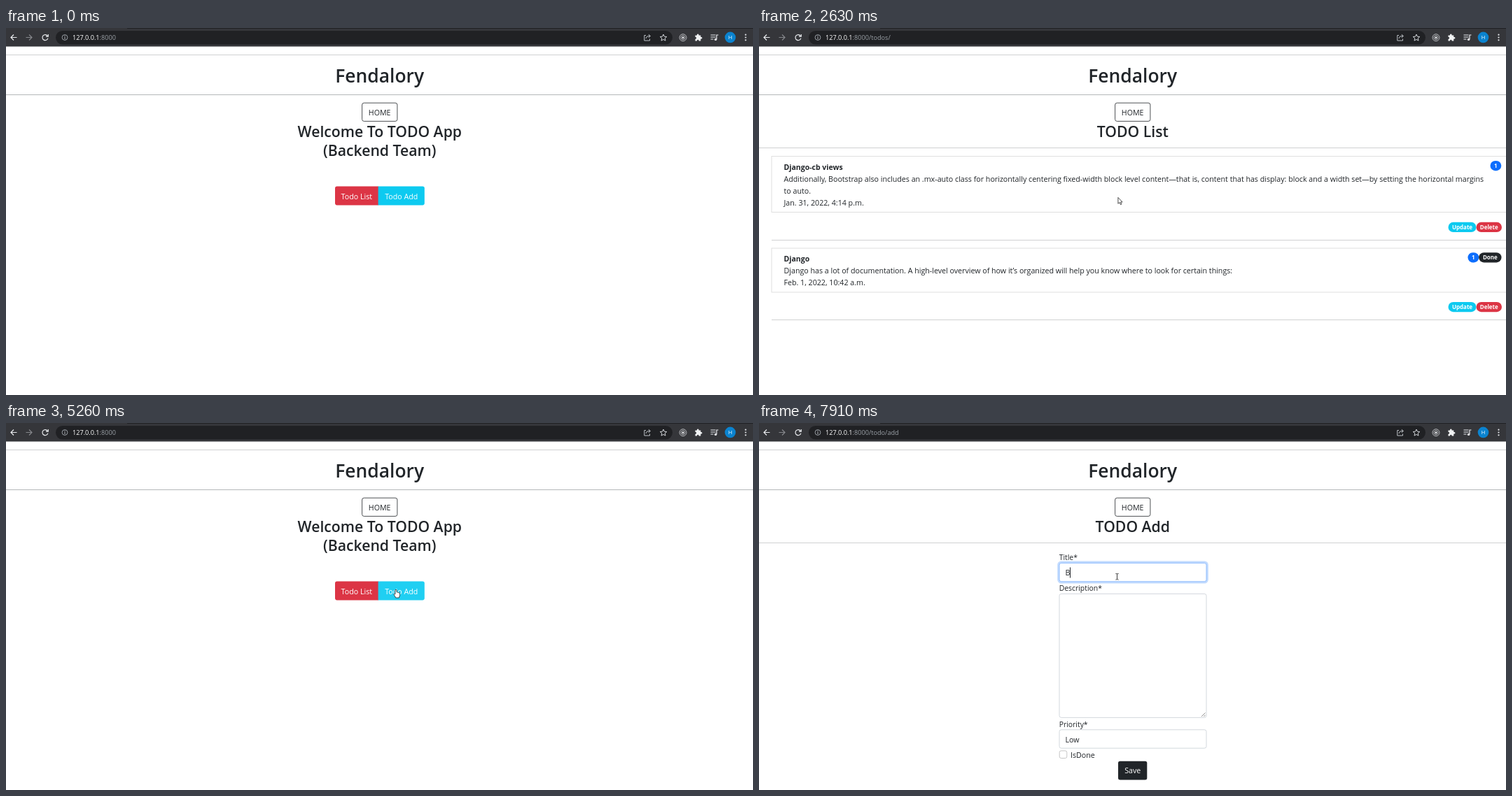
An HTML page that plays this animation: 1067x525 px, repeating every 8 s.

```html
<!DOCTYPE html>
<html lang="en">
<head>
<meta charset="utf-8">
<title>Todo app</title>
<style>
html, body { margin: 0; width: 100%; height: 100%; overflow: hidden; background: #fff; }
svg { display: block; width: 100%; height: 100%; }
text { font: 10.66px "Open Sans", "Noto Sans", sans-serif; fill: #212529; white-space: pre; }
.h1 { font-size: 26.4px; font-weight: 600; }
.h2 { font-size: 21.2px; font-weight: 600; }
.bold { font-size: 10.5px; font-weight: 700; }
.badge { font-size: 8px; font-weight: 700; fill: #fff; }
.label { font-size: 10.4px; }
.light { fill: #fff; }
.url { font-size: 9.15px; fill: #9aa0a6; }
.host { fill: #fff; }
.avatar { font-size: 7.5px; fill: #fff; }
.mid { text-anchor: middle; }
.line { fill: none; stroke: #e8eaed; stroke-width: 1.2; }
</style>
</head>
<body>
<svg id="stage" viewBox="0 0 1067 525" xmlns="http://www.w3.org/2000/svg"></svg>
<script>
const LOOP = 8000;
const DARK = '#212529', RED = '#dc3545', CYAN = '#0dcaf0', BLUE = '#0d6efd';

const text = (x, y, str, cls = '') => `<text x="${x}" y="${y}" class="${cls}">${str}</text>`;
const mid = (x, y, str, cls = '') => text(x, y, str, cls + ' mid');
const rect = (x, y, w, h, fill, extra = '') =>
  `<rect x="${x}" y="${y}" width="${w}" height="${h}" fill="${fill}" ${extra}/>`;
const path = (d, extra = 'class="line"') => `<path d="${d}" ${extra}/>`;
const circle = (x, y, r, extra) => `<circle cx="${x}" cy="${y}" r="${r}" ${extra}/>`;
const rule = (x, y, color = '#d0d1d2') => rect(x, y, 1067 - x, 1, color);
const field = (y, h, id = '') =>
  rect(429, y, 210, h, '#fff', `rx="2.8" stroke="#ced4da" stroke-width=".9" ${id}`);
const badge = (x, y, w, color, str) =>
  rect(x, y, w, 14.2, color, 'rx="7.1"') + mid(x + w / 2, y + 10, str, 'badge');
const actions = y => badge(984.5, y, 40, CYAN, 'Update') + badge(1024.5, y, 36.5, RED, 'Delete');
const card = (y, h) => rect(18, y, 1060, h, '#fff', 'stroke="#dfdfdf" stroke-width="1"');
const group = (id, body) => `<g id="${id}">${body}</g>`;

const toolbar = () => rect(0, 0, 1067, 26.5, '#35363a') + rect(173, 0, 894, 1, '#202124')
  + rect(71, 4, 881, 19.5, '#202124', 'rx="9.7"')
  + path('M15.5 13.5H7M11 9.5L7 13.5L11 17.5')
  + path('M28.5 13.5H37M33 9.5L37 13.5L33 17.5', 'class="line" style="stroke:#85878b"')
  + path('M59.3 11.3A4 4 0 1 0 59.9 14.6M60.3 9V12.2H57')
  + circle(84, 13.5, 3.9, 'class="line" style="stroke:#9aa0a6;stroke-width:1"')
  + path('M84 12.8V15.8M84 11V12', 'class="line" style="stroke:#bdc1c6;stroke-width:1"')
  + `<text x="95" y="17" class="url"><tspan class="host">127.0.0.1</tspan>:8000<tspan id="route"></tspan></text>`
  + path('M914 10.5H911.8V18H919.5V15.5M914 15Q914.5 11.5 918 11.5H920M917.8 9L920.3 11.5L917.8 14',
      'class="line" style="stroke:#bdc1c6;stroke-width:1"')
  + path('M939 9L940.4 12.2L943.8 12.5L941.2 14.8L942 18.1L939 16.4L936 18.1L936.8 14.8L934.2 12.5L937.6 12.2Z',
      'class="line" style="stroke:#d0d3d7;stroke-width:1"')
  + [5, 3].map(r => circle(967, 13.7, r, 'class="line" style="stroke:#c4c7ca;stroke-width:.9"')).join('')
  + circle(967, 13.7, 1.5, 'fill="#e8eaed"')
  + path('M984.5 10.5H987Q986.5 8.5 988.3 8.5Q990 8.5 989.6 10.5H992.3V13Q994.4 12.6 994.4 14.2Q994.4 16 992.3 15.5V18.5H989.8Q989.6 16.8 988.3 16.8Q987 16.8 986.8 18.5H984.5V16Q986.2 15.5 986.2 14.2Q986.2 13 984.5 12.8Z',
      'fill="#f1f3f4"')
  + path('M1006.5 10H1013.5M1006.5 13H1013.5M1006.5 16H1010.5M1015 16.3V10H1017.5')
  + circle(1013.6, 16.4, 1.7, 'fill="#e8eaed"')
  + circle(1034.5, 13.4, 7.8, 'fill="#0b83cf"') + mid(1034.5, 16.2, 'H', 'avatar')
  + [9.7, 13.5, 17.3].map(y => circle(1056.5, y, 1.1, 'fill="#e8eaed"')).join('');

const header = () => rule(0, 38) + mid(533.7, 77.5, 'Fendalory', 'h1') + rule(0, 95, '#b5b7b9')
  + rect(507.2, 105.8, 53.2, 29.2, 'none', 'id="homeRing" rx="4" stroke="#909294" stroke-width="2.8"')
  + rect(508.6, 107.2, 50.3, 26.2, '#fff', 'id="homeBox" rx="2.8" stroke="#212529" stroke-width=".8"')
  + `<text x="533.7" y="124.5" class="mid" id="homeText">HOME</text>`;

const welcome = () => mid(533.8, 156, 'Welcome To TODO App', 'h2') + mid(533.8, 183, '(Backend Team)', 'h2')
  + path('M532 226.6H472.8Q470 226.6 470 229.4V250.6Q470 253.4 472.8 253.4H532Z', 'id="listBox"')
  + path('M531.6 226.6H595Q597.8 226.6 597.8 229.4V250.6Q597.8 253.4 595 253.4H531.6Z', 'id="addBox"')
  + mid(500.8, 244.5, 'Todo List', 'light') + mid(564.7, 244.5, 'Todo Add', 'light');

const list = () => mid(533.8, 156, 'TODO List', 'h2') + rule(0, 171)
  + card(183.5, 80) + text(35.5, 203, 'Django-cb views', 'bold')
  + text(35.5, 220, 'Additionally, Bootstrap also includes an .mx-auto class for horizontally centering fixed-width block level content—that is, content that has display: block and a width set—by setting the horizontal margins')
  + text(35.5, 237, 'to auto.') + text(35.5, 253.5, 'Jan. 31, 2022, 4:14 p.m.')
  + badge(1044.5, 190, 15.8, BLUE, '1') + actions(277.8) + rule(18, 303)
  + card(315, 63) + text(35.5, 334, 'Django', 'bold')
  + text(35.5, 351, 'Django has a lot of documentation. A high-level overview of how it’s organized will help you know where to look for certain things:')
  + text(35.5, 368, 'Feb. 1, 2022, 10:42 a.m.')
  + badge(1012.5, 321.2, 15.8, BLUE, '1') + badge(1028.2, 321.2, 32.3, DARK, 'Done')
  + actions(392) + rule(18, 417);

const form = () => mid(533.8, 156, 'TODO Add', 'h2') + rule(0, 171)
  + text(428.7, 196, 'Title*', 'label')
  + rect(427.6, 198.9, 212.8, 29.2, 'none', 'id="focusRing" rx="4" stroke="#c2dbfe" stroke-width="2.8"')
  + field(200.4, 26.4, 'id="titleBox"') + text(437.6, 218, 'B').replace('<text', '<text id="typed"')
  + rect(0, 206.5, 1, 15, DARK, 'id="caret"')
  + text(428.7, 240, 'Description*', 'label') + field(244.4, 177)
  + path('M632 420L637.5 414.5M635.3 420L637.5 417.8', 'stroke="#777" stroke-width=".8"')
  + text(428.7, 434.7, 'Priority*', 'label') + field(438.8, 26.4) + text(437.6, 457, 'Low')
  + rect(429.2, 468.9, 10.6, 10.6, '#fff', 'rx="2.4" stroke="#bfbfbf" stroke-width=".9"')
  + text(445, 478.6, 'IsDone')
  + rect(513, 483.8, 41.3, 26.7, DARK, 'rx="2.8"') + mid(533.7, 501.4, 'Save', 'light');

const pointers = () =>
  group('arrow', path('M.4 .4V9.3L2.5 7.5L4 10.7L5.4 10L4 7H6.6Z',
    'fill="#fff" stroke="#222" stroke-width=".8"'))
  + group('hand', path('M-1.1 1Q0 -.7 1.1 1V4Q2.1 3.3 2.7 4.5Q3.6 3.9 4.2 5Q5.5 4.7 5.5 6.2V8.6L4.4 12H-.4Q-1.2 9.8 -3 7.5Q-3 5.8 -1.1 7Z',
    'fill="#fff" stroke="#222" stroke-width=".8"'))
  + group('beam', path('M-2 .5H-.6L0 1L.6 .5H2M0 1V8.5M-2 9H-.6L0 8.5L.6 9H2',
    'fill="none" stroke="#222" stroke-width=".9"'));

const stage = document.getElementById('stage');
stage.innerHTML = toolbar() + header() + group('welcome', welcome()) + group('list', list())
  + group('form', form()) + pointers();

const $ = id => document.getElementById(id);
const show = (id, on) => $(id).setAttribute('visibility', on ? 'inherit' : 'hidden');
const fill = (id, color) => $(id).setAttribute('fill', color);

// Latest entry whose start time has passed.
const at = (steps, t) => steps.filter(s => s[0] <= t).pop();

const pointerSteps = [
  [0, '', 0, 0],
  [1040, 'arrow', 701, 436], [1300, 'arrow', 710, 430], [1570, 'arrow', 439, 310],
  [1830, 'hand', 529, 240], [2090, 'hand', 515, 247], [2380, 'hand', 513, 242],
  [2630, 'arrow', 512.5, 242], [2890, 'arrow', 513, 242], [3160, 'arrow', 521, 206],
  [3430, 'hand', 546, 117], [3690, 'hand', 545, 112.5],
  [5260, 'hand', 557, 238], [5790, 'arrow', 556.5, 237], [6320, 'arrow', 541, 234],
  [6600, 'beam', 511.5, 215]
];
const pageSteps = [[0, 'welcome', ''], [2630, 'list', '/todos/'], [4230, 'welcome', ''], [5790, 'form', '/todo/add']];
const homeSteps = [[0, '#fff'], [3430, '#3c4044'], [3690, DARK], [5260, '#fff']];
const listSteps = [[0, RED], [1830, '#c5303f'], [2090, '#bb2d3b'], [2630, RED]];
const addSteps = [[0, CYAN], [5260, '#20cff2'], [5520, '#31d2f2']];

function draw(t) {
  const [, page, route] = at(pageSteps, t);
  for (const id of ['welcome', 'list', 'form']) $(id).setAttribute('display', id === page ? 'inline' : 'none');
  $('route').textContent = route;

  const home = at(homeSteps, t)[1];
  fill('homeBox', home);
  fill('listBox', at(listSteps, t)[1]);
  fill('addBox', at(addSteps, t)[1]);
  $('homeText').style.fill = home === '#fff' ? DARK : '#fff';
  show('homeRing', t >= 3960 && t < 4230);

  const focused = t >= 6860, typed = t >= 7910;
  show('focusRing', focused);
  $('titleBox').setAttribute('stroke', focused ? '#86b7fe' : '#ced4da');
  show('typed', typed);
  show('caret', typed || (focused && t < 7380));
  $('caret').setAttribute('x', typed ? 444 : 438);

  const [, kind, x, y] = at(pointerSteps, t);
  for (const id of ['arrow', 'hand', 'beam']) show(id, id === kind);
  if (kind) $(kind).setAttribute('transform', `translate(${x} ${y})`);
}

const start = performance.now();
function tick() {
  draw((performance.now() - start) % LOOP);
  requestAnimationFrame(tick);
}
tick();
</script>
</body>
</html>
```
